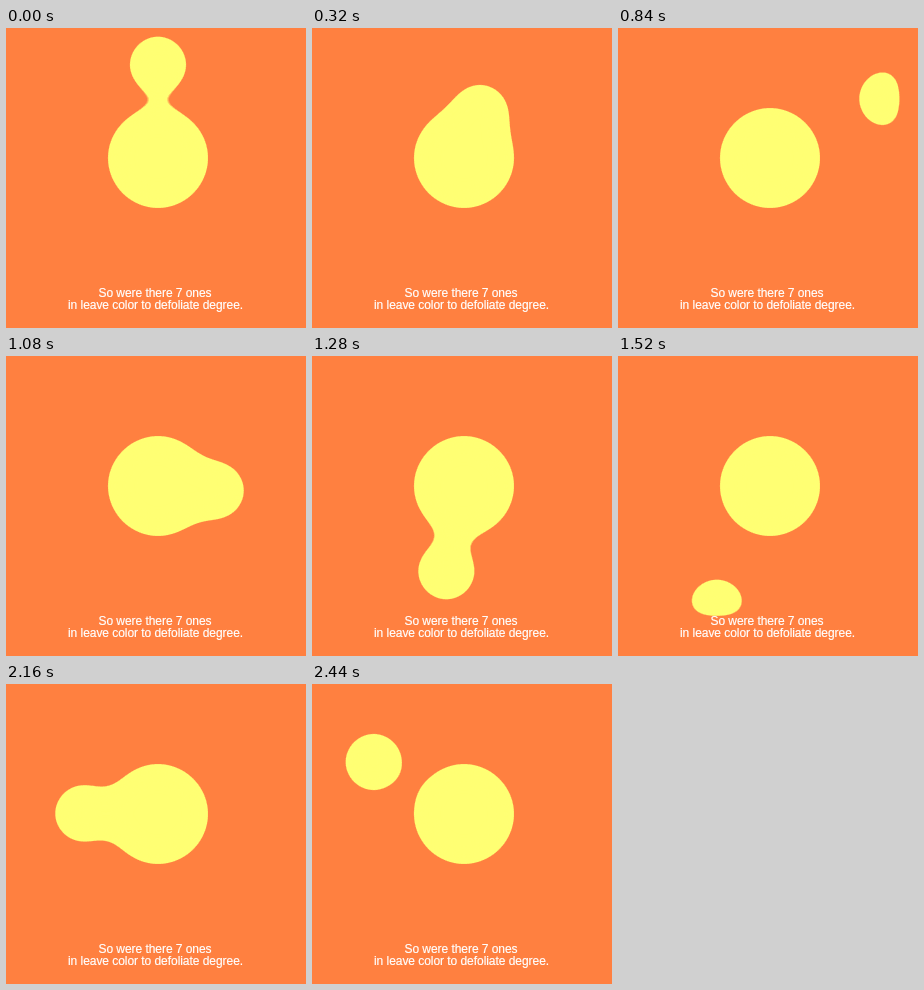
An HTML page for the animation above (2.52 s loop, 300 px wide and 300 px high).

```html
<!DOCTYPE html>
<html lang="en">
<head>
<meta charset="utf-8">
<title>Gooey drop</title>
<style>
  html, body { margin: 0; width: 100%; height: 100%; overflow: hidden; background: #ff8040; }
  svg { display: block; width: 100vw; height: 100vh; }
  text {
    font: 12px "Liberation Sans", Arial, sans-serif;
    letter-spacing: -0.05px;
    fill: #fff;
    stroke: #fff;
    stroke-width: 0.2px;
  }
</style>
</head>
<body>
<svg viewBox="0 0 300 300">
  <defs>
    <filter id="goo" filterUnits="userSpaceOnUse" x="-50" y="-50" width="400" height="400"
            color-interpolation-filters="sRGB">
      <feGaussianBlur stdDeviation="13"/>
      <feColorMatrix values="1 0 0 0 0  0 1 0 0 0  0 0 1 0 0  0 0 0 30 -14.5"/>
    </filter>
    <clipPath id="box"><rect x="22" width="259.5" height="260"/></clipPath>
  </defs>
  <g filter="url(#goo)">
    <g clip-path="url(#box)" fill="#ffff73">
      <circle cx="152" cy="130" r="51.5"/>
      <circle id="drop" r="30.8"/>
    </g>
  </g>
  <text x="92.5" y="269">So were there 7 ones</text>
  <text x="62" y="281">in leave color to defoliate degree.</text>
</svg>
<script>
  const LOOP = 2520, STEP = 40, LAST = 2440;

  // the drop eases in a straight line from stop to stop
  const stops = [
    { at: 0, x: 152, y: 36.7 },
    { at: 320, x: 168, y: 85 },
    { at: 804, x: 270.5, y: 69.5 },
    { at: 1484, x: 99, y: 253 },
    { at: 1996, x: 84, y: 151.5 },
    { at: LAST, x: 61.7, y: 78 }
  ];

  const drop = document.getElementById("drop");
  const ease = u => (1 - Math.cos(Math.PI * u)) / 2;
  const mix = (a, b, k) => a + (b - a) * k;

  function place(time) {
    const t = Math.min(LAST, Math.floor((time % LOOP) / STEP) * STEP);
    const next = stops.findIndex(s => s.at > 0 && s.at >= t);
    const a = stops[next - 1], b = stops[next];
    const k = ease((t - a.at) / (b.at - a.at));
    drop.setAttribute("cx", mix(a.x, b.x, k));
    drop.setAttribute("cy", mix(a.y, b.y, k));
  }

  const start = performance.now();
  function tick() {
    place(performance.now() - start);
    requestAnimationFrame(tick);
  }
  tick();
</script>
</body>
</html>
```
